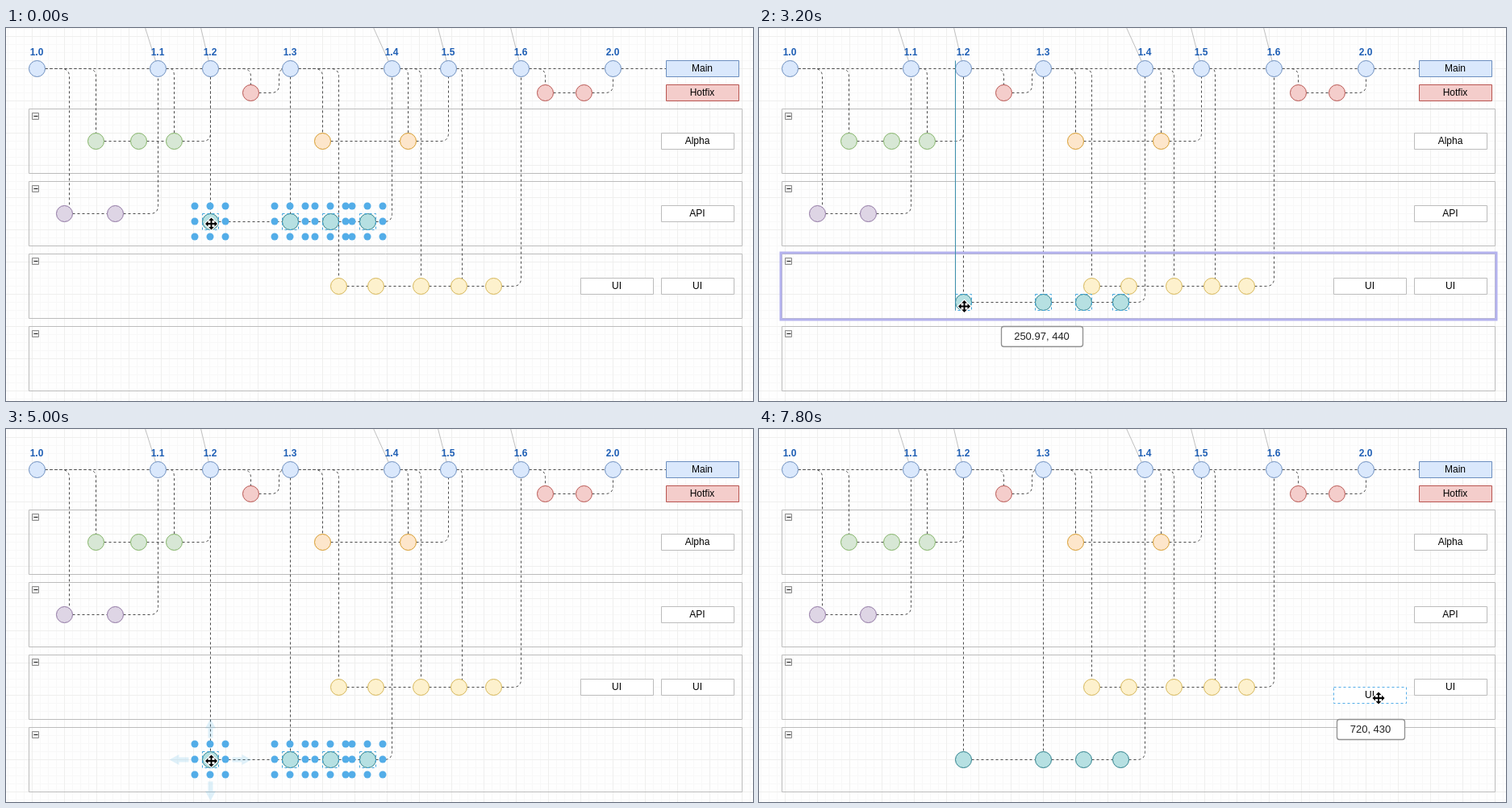
An HTML page with a canvas for the animation above (8 s loop, 926 by 463 pixels).

```html
<!DOCTYPE html>
<html lang="en">
<head>
<meta charset="utf-8">
<title>Branch diagram</title>
<style>
html, body { margin: 0; width: 100%; height: 100%; overflow: hidden; background: #fefefe; }
canvas { display: block; }
</style>
</head>
<body>
<canvas id="stage" width="926" height="463"></canvas>
<script>
const ctx = document.getElementById('stage').getContext('2d');
const W = 926, H = 463, LOOP = 8000, STEP = 200;
const FONT = '"Liberation Sans", Arial, sans-serif';
const EDGE = '#4a4a4a', BLUE = '#53ade8';
const MAIN_Y = 50, R = 10;

const COLORS = {
  main: ['#dae8fc', '#6c8ebf'],
  hotfix: ['#f4cdcb', '#b85450'],
  green: ['#d7e7d5', '#82b366'],
  purple: ['#ded5e5', '#8f75a2'],
  orange: ['#fde6cb', '#d79b2a'],
  yellow: ['#fdf1cd', '#d6b656'],
  teal: ['#b6e0e2', '#2b7f8a']
};

// lean: how far left the incoming grey line starts at the top
const VERSIONS = [
  { x: 38, name: '1.0' },
  { x: 188, name: '1.1', lean: 16 },
  { x: 253, name: '1.2', lean: 12 },
  { x: 352, name: '1.3' },
  { x: 478, name: '1.4', lean: 23 },
  { x: 548, name: '1.5', lean: 13 },
  { x: 638, name: '1.6', lean: 13 },
  { x: 752, name: '2.0' }
];

// each branch forks off the main line and merges back into it
const BRANCHES = [
  { kind: 'hotfix', y: 80, nodes: [303], forks: [303], merge: 338 },
  { kind: 'hotfix', y: 80, nodes: [668, 716], forks: [668], merge: 752 },
  { kind: 'green', y: 140, nodes: [111, 164, 208], forks: [111, 208], merge: 253 },
  { kind: 'orange', y: 140, nodes: [392, 498], forks: [392, 498], merge: 548 },
  { kind: 'purple', y: 230, nodes: [72, 135], forks: [78], merge: 188 },
  { kind: 'yellow', y: 320, nodes: [412, 458, 514, 561, 604], forks: [412, 514, 565], merge: 638 }
];
const TEAL = { kind: 'teal', nodes: [253, 352, 402, 448], forks: [253, 352], merge: 478 };
const LANES = [0, 1, 2, 3].map(i => 100 + 90 * i);

function ease(t, from, to) {
  const p = Math.min(1, Math.max(0, (t - from) / (to - from)));
  return p * p * (3 - 2 * p);
}

function pointerAt(t) {
  const drop = ease(t, 2800, 3500), travel = ease(t, 6600, 7300), pull = ease(t, 7600, 7800);
  return [254.5 + 513.5 * travel, 243 + 169 * drop - 88 * travel + 10 * pull];
}

function stroke(color, dash = [], width = 1) {
  ctx.setLineDash(dash);
  ctx.strokeStyle = color;
  ctx.lineWidth = width;
  ctx.stroke();
}

function line(x0, y0, x1, y1, color) {
  ctx.beginPath();
  ctx.moveTo(x0, y0);
  ctx.lineTo(x1, y1);
  stroke(color);
}

function toward([x, y], [tx, ty]) {
  const d = Math.hypot(tx - x, ty - y);
  const k = d ? Math.min(10, d / 2) / d : 0;
  return [x + (tx - x) * k, y + (ty - y) * k];
}

// dashed connector with rounded corners
function edge(...points) {
  ctx.beginPath();
  ctx.moveTo(...points[0]);
  for (let i = 1; i < points.length - 1; i++) {
    ctx.lineTo(...toward(points[i], points[i - 1]));
    ctx.quadraticCurveTo(...points[i], ...toward(points[i], points[i + 1]));
  }
  ctx.lineTo(...points.at(-1));
  stroke(EDGE, [3, 3]);
}

function box(x, y, w, h, fill, color, dash, width) {
  ctx.beginPath();
  ctx.rect(x, y, w, h);
  if (fill) { ctx.fillStyle = fill; ctx.fill(); }
  if (color) stroke(color, dash, width);
}

function disc(x, y, r, fill) {
  ctx.beginPath();
  ctx.arc(x, y, r, 0, 2 * Math.PI);
  ctx.fillStyle = fill;
  ctx.fill();
}

function text(s, x, y, size = 12, color = '#000', weight = 'normal') {
  ctx.font = `${weight} ${size}px ${FONT}`;
  ctx.textAlign = 'center';
  ctx.fillStyle = color;
  ctx.fillText(s, x - 0.5, y + Math.round(size * 0.34) - 0.5);
}

function tag(s, x, y, [fill, color] = ['#fff', '#bcbcbc'], dash) {
  box(x, y, 90, 20, fill, color, dash);
  text(s, x + 45, y + 10);
}

function node(x, y, kind) {
  disc(x, y, R, COLORS[kind][0]);
  stroke(COLORS[kind][1]);
}

function handles(cx, cy, dx, dy) {
  for (const i of [-1, 0, 1])
    for (const j of [-1, 0, 1])
      if (i || j) disc(cx + i * dx - 0.5, cy + j * dy - 0.5, 4.5, BLUE);
}

// repeats an arrow outline in four directions as one shape
function fourArrows(x, y, outline) {
  ctx.beginPath();
  for (let i = 0; i < 4; i++) {
    const a = i * Math.PI / 2, c = Math.cos(a), s = Math.sin(a);
    outline.forEach(([u, v]) => ctx.lineTo(x + u * c - v * s, y + u * s + v * c));
  }
  ctx.closePath();
}

function arrow(base, neck, tip, shaft, head) {
  return [[base, -shaft], [neck, -shaft], [neck, -head], [tip, 0],
    [neck, head], [neck, shaft], [base, shaft]];
}

function hoverArrows(x, y) {
  ctx.fillStyle = 'rgba(80, 175, 230, 0.18)';
  for (const turn of [0, 1, 2, 3]) {
    ctx.save();
    ctx.translate(x, y);
    ctx.rotate(turn * Math.PI / 2);
    ctx.beginPath();
    arrow(27, 39, 51, 3, 6.5).forEach(p => ctx.lineTo(...p));
    ctx.fill();
    ctx.restore();
  }
}

function moveCursor(x, y) {
  fourArrows(x - 0.5, y - 0.5, arrow(1, 4, 7.5, 1, 3.4));
  ctx.lineJoin = 'round';
  stroke('#fff', [], 2.4);
  ctx.lineJoin = 'miter';
  ctx.fillStyle = '#000';
  ctx.fill();
}

function tooltip(s, x, y, w) {
  ctx.save();
  ctx.shadowColor = 'rgba(0, 0, 0, 0.35)';
  ctx.shadowBlur = 6;
  ctx.shadowOffsetX = ctx.shadowOffsetY = 2;
  box(x, y, w, 25, '#f8f9fa');
  ctx.restore();
  box(x, y, w, 25, null, '#2a2a2a');
  text(s, x + w / 2, y + 13, 11);
}

function dragLabel(s, cx, y, w) {
  ctx.beginPath();
  ctx.roundRect(cx - w / 2, y, w, 25, 3);
  ctx.fillStyle = '#fff';
  ctx.fill();
  stroke('#909090', [], 1.3);
  text(s, cx, y + 13, 13, '#222');
}

function grid() {
  for (const [gap, x0, y0, color] of [[10, 2, 0, '#f8f8f8'], [40, 32, 10, '#efefee']]) {
    for (let x = x0; x < W; x += gap) line(x, -1, x, H, color);
    for (let y = y0; y < H; y += gap) line(-1, y, W, y, color);
  }
}

function lane(y) {
  box(28, y, 884, 80, null, '#bcbcbc');
  box(32, y + 5, 8, 8, '#e9e9e9', '#8a8a8a');
  line(34, y + 9, 39, y + 9, '#222');
}

function mainEdges() {
  for (const { x, lean } of VERSIONS)
    if (lean) line(x - lean, -1, x, MAIN_Y, '#c0c0c0');
  const stops = [...VERSIONS.map(v => v.x), 818];
  stops.slice(1).forEach((x, i) => edge([stops[i] + R, MAIN_Y], [x, MAIN_Y]));
}

function branchEdges({ y, nodes, forks, merge }) {
  for (const x of forks) {
    const from = VERSIONS.findLast(v => v.x <= x).x;
    if (from === x) edge([x, MAIN_Y + R], [x, y]);
    else edge([from + R, MAIN_Y], [x, MAIN_Y], [x, y]);
  }
  nodes.slice(1).forEach((x, i) => edge([nodes[i] + R, y], [x - R, y]));
  const into = VERSIONS.find(v => v.x >= merge).x;
  edge([nodes.at(-1) + R, y], [merge, y], [merge, MAIN_Y], [into, MAIN_Y]);
}

function dragOverlay(y) {
  const over = LANES.find(top => y >= top && y <= top + 80);
  if (over > LANES[1]) box(26.5, over - 1.5, 887, 83, null, '#b4b2ee', [], 3);
  line(243, 40, 243, y + R, '#3c8fac');
  dragLabel(`250.97, ${y + 100}`, 350.5, y + 30, 101);
}

function draw(t) {
  const within = (from, to) => t >= from && t < to;
  const [px, py] = pointerAt(t);
  const dragging = within(3000, 3800);
  const selected = t < 7600, pulling = t >= 7800;
  const tealY = t < 3000 ? 240 : Math.round((py - 2) / 10) * 10;
  const teal = { ...TEAL, y: t < 3800 ? tealY : 410 };
  const branches = [...BRANCHES, teal];
  const uiY = pulling ? 320 : 310;

  ctx.setTransform(1, 0, 0, 1, 0, 0);
  ctx.fillStyle = '#fefefe';
  ctx.fillRect(0, 0, W, H);
  ctx.translate(0.5, 0.5);
  grid();
  LANES.forEach(lane);

  mainEdges();
  branches.forEach(branchEdges);
  for (const { x, name } of VERSIONS) {
    node(x, MAIN_Y, 'main');
    text(name, x, 30, 12, '#1f5fb5', 'bold');
  }
  for (const { kind, y, nodes } of branches) nodes.forEach(x => node(x, y, kind));

  tag('Main', 818, 40, COLORS.main);
  tag('Hotfix', 818, 70, COLORS.hotfix);
  ['Alpha', 'API', 'UI'].forEach((s, i) => tag(s, 812, LANES[i] + 30));
  if (selected) tag('UI', 712, uiY);
  else tag('UI', 712, uiY, ['#fff', BLUE], [3, 3]);

  if (selected) {
    for (const x of teal.nodes) {
      box(x - R, teal.y - R, 2 * R, 2 * R, null, '#3fa4dc', [3, 3]);
      if (!dragging) handles(x, teal.y, 19, 19);
    }
  } else if (!pulling) {
    handles(757, 320, 54, 19);
  }

  if (within(1000, 2800) || within(4000, 6800)) hoverArrows(253, teal.y);
  if (dragging) dragOverlay(teal.y);
  if (pulling) dragLabel(`720, ${uiY + 110}`, 758, uiY + 40, 84);
  if (within(1400, 2600)) tooltip('API', 256, 258, 31);
  if (within(5400, 6600)) tooltip('A/B test', 257, 431, 52);
  moveCursor(px, py);
}

const start = performance.now();
function frame() {
  const t = (performance.now() - start) % LOOP;
  draw(Math.floor(t / STEP) * STEP);
  requestAnimationFrame(frame);
}
frame();
</script>
</body>
</html>
```
